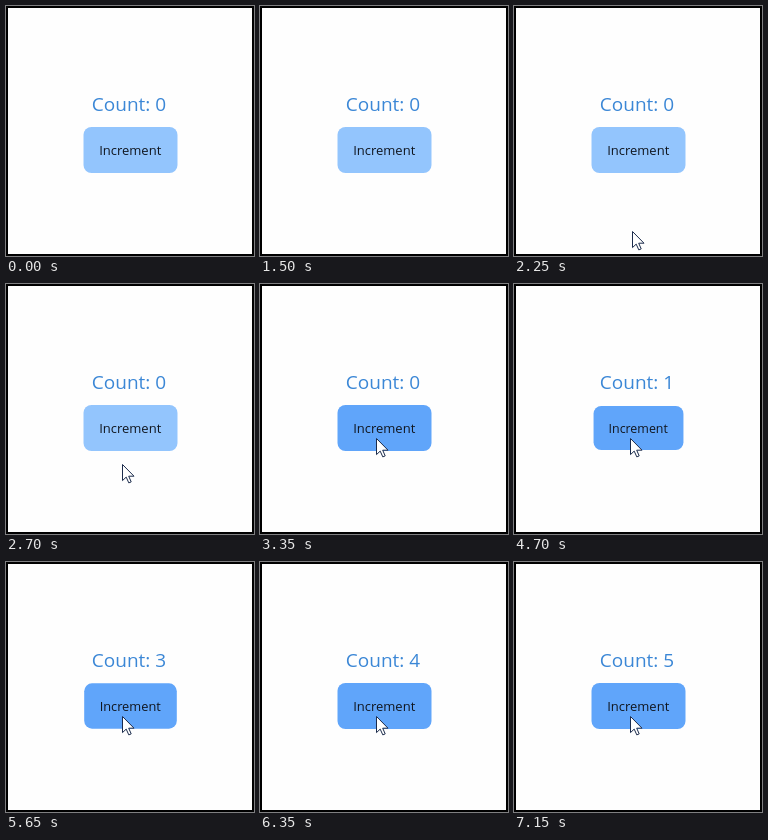
Animation of 248 by 250 pixels, one loop 8 s. Source, as an HTML page:

```html
<!DOCTYPE html>
<html lang="en">
<head>
<meta charset="utf-8">
<title>Counter</title>
<style>
  html, body { margin: 0; width: 100%; height: 100%; overflow: hidden; background: #fefefe; }
  svg { display: block; width: 248px; height: 250px; }
  text { font-family: "Open Sans", "Noto Sans", sans-serif; text-anchor: middle; }
</style>
</head>
<body>
<svg viewBox="0 0 248 250">
  <text id="count" x="123" y="105" font-size="19" fill="#3b87d6">Count: 0</text>
  <g id="button">
    <rect id="face" x="77.5" y="121" width="94" height="46" rx="8"/>
    <text x="124.2" y="149" font-size="13" fill="#10161f">Increment</text>
  </g>
  <path id="cursor" d="M.5 .5V16.6L4.2 13.1L6.8 18.9L9.2 17.9L6.7 12.2H12Z"
        fill="#fff" stroke="#1c2c4c" stroke-linejoin="round"/>
  <rect x="1" y="1" width="246" height="248" fill="none" stroke="#000" stroke-width="2"/>
</svg>
<script>
const LOOP = 8000, STEP = 50;
// press time, release time, length of the spring back
const clicks = [
  [3750, 4000, 100], [4700, 4950, 150], [5450, 5650, 150],
  [6050, 6250, 150], [6850, 7050, 150]
];
// time, x, y of the pointer tip
const path = [
  [1700, 120, 243], [2050, 118, 225], [2250, 118, 225], [2700, 116, 180],
  [2750, 116, 164], [3100, 116, 164], [3350, 116, 154]
];
const $ = id => document.getElementById(id);
const clamp = v => Math.min(1, Math.max(0, v));
const mix = (a, b, p) => a + (b - a) * p;
const ease = p => 1 - (1 - p) ** 3;
const ramp = (t, start, length) => t < start ? 0 : ease(clamp((t - start + STEP) / length));

function pointer(t) {
  let i = 0;
  while (i < path.length - 2 && t >= path[i + 1][0]) i++;
  const [a, b] = [path[i], path[i + 1]];
  const p = clamp((t - a[0]) / (b[0] - a[0]));
  return [mix(a[1], b[1], p), mix(a[2], b[2], p)];
}

function draw(t) {
  let pressed = 0, count = 0;
  for (const [down, up, length] of clicks) {
    pressed += ramp(t, down, 100) - ramp(t, up, length);
    if (t >= up) count++;
  }
  $('count').textContent = 'Count: ' + count;

  const hover = ramp(t, 2750, 150);
  const color = [[147, 96], [197, 165], [253, 250]].map(([a, b]) => Math.round(mix(a, b, hover)));
  $('face').setAttribute('fill', `rgb(${color})`);
  $('button').setAttribute('transform',
    `translate(124.5 144) scale(${1 - 0.05 * pressed}) translate(-124.5 -144)`);

  $('cursor').setAttribute('transform', `translate(${pointer(t)})`);
  $('cursor').style.display = t < path[0][0] ? 'none' : '';
}

const began = performance.now();
function tick() {
  const t = (performance.now() - began) % LOOP;
  draw(Math.floor(t / STEP) * STEP);
  requestAnimationFrame(tick);
}
tick();
</script>
</body>
</html>
```
